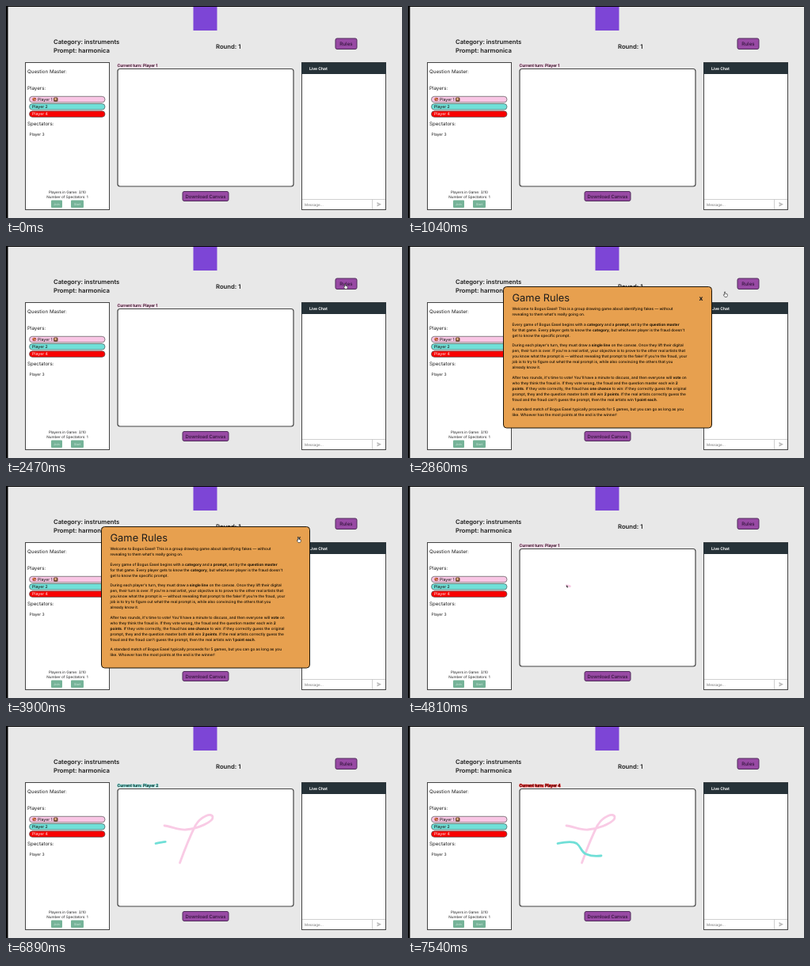
These frames come from a looping animation (500 by 268 pixels, 8000 ms). An HTML page:

```html
<!DOCTYPE html>
<html lang="en">
<head>
<meta charset="utf-8">
<title>Drawing game</title>
<style>
html, body { margin: 0; width: 100%; height: 100%; overflow: hidden; background: #e8e8e8; }
svg { display: block; width: 500px; height: 268px; }
text { font-family: Inter, "Open Sans", sans-serif; fill: #1c1c1c; text-rendering: geometricPrecision; }
.head { font-size: 7.7px; font-weight: 600; }
.label { font-size: 6.2px; }
.small { font-size: 4.6px; }
.pill { font-size: 5.1px; font-weight: 500; }
.mid { text-anchor: middle; }
.halo { paint-order: stroke; stroke-width: 1; stroke-linejoin: round; }
.panel { fill: #fff; stroke: #444; }
.button { fill: #984aa4; stroke: #4f2a5a; }
.caption { fill: #2f1438; font-weight: 500; }
.green { fill: #75b398; }
.tiny { font-size: 3.8px; fill: #d4e9df; }
.ink { fill: none; stroke-width: 2.8; stroke-linecap: round; stroke-linejoin: round; }
.rules text { font-size: 4.75px; font-weight: 500; fill: #120c04; }
.rules .b { font-weight: 700; }
</style>
</head>
<body>
<svg viewBox="0 0 500 268">
  <rect width="500" height="268" fill="#e8e8e8"/>
  <path d="M0 0H500V1H2.5V268H0Z"/>
  <rect x="236.5" y="1" width="30" height="30" fill="#7d45d6"/>

  <text class="head" x="60" y="48">Category: instruments</text>
  <text class="head" x="60" y="59">Prompt: harmonica</text>
  <text class="head" x="265" y="53.5">Round: 1</text>
  <rect class="button" x="416" y="41" width="27" height="13.5" rx="2"/>
  <text class="label caption mid" x="429.5" y="50">Rules</text>

  <rect class="panel" x="24.5" y="71.5" width="106" height="186"/>
  <text class="label" x="27" y="85">Question Master:</text>
  <text class="label" x="27" y="106">Players:</text>
  <g stroke="#555" stroke-width=".7">
    <rect x="29.5" y="114.3" width="95.5" height="7.6" rx="3.8" fill="#f9c6e5"/>
    <rect x="29.5" y="123.5" width="95.5" height="7.6" rx="3.8" fill="#70e0d8"/>
    <rect x="29.5" y="132.8" width="95.5" height="7.6" rx="3.8" fill="#f80000"/>
  </g>
  <ellipse cx="35.8" cy="118" rx="2.6" ry="2.2" fill="#b5523e"/>
  <circle cx="35" cy="117.2" r=".6" fill="#ffd24a"/>
  <circle cx="36.8" cy="118.6" r=".6" fill="#fff"/>
  <rect x="60" y="115.5" width="5.5" height="5.2" rx="1.5" fill="#6b4930"/>
  <circle cx="62.5" cy="117.7" r="1.4" fill="#eeb48a"/>
  <text class="pill" x="40" y="119.8">Player 1</text>
  <text class="pill" x="33" y="129">Player 2</text>
  <text class="pill" x="33" y="138.3" style="fill:#ffd0d0">Player 4</text>
  <text class="label" x="27" y="151">Spectators:</text>
  <text x="29.5" y="164" font-size="5">Player 3</text>
  <text class="small mid" x="77.5" y="236.5">Players in Game: 3/10</text>
  <text class="small mid" x="77.5" y="243">Number of Spectators: 1</text>
  <rect class="green" x="57" y="245.5" width="14" height="9.5" rx="1"/>
  <rect class="green" x="82" y="245.5" width="16" height="9.5" rx="1"/>
  <text class="tiny mid" x="64" y="251.6">Join</text>
  <text class="tiny mid" x="90" y="251.6">Start</text>

  <text id="turn" class="halo" x="140.5" y="77" font-size="5" font-weight="600"></text>
  <rect x="141" y="79.5" width="222" height="148.5" rx="3" fill="#fff" stroke="#444" stroke-width="1.2"/>
  <path id="pink" class="ink" pathLength="1" stroke="#f9cbe5"
    d="M200 126C209 127 217 131.5 227 131C242 130 262 121 261 115C260 109 246 114 239 126C231 142 226 155 219.5 173"/>
  <path id="teal" class="ink" pathLength="1" stroke="#70dfd7"
    d="M189 148.5C196 147 207 144.5 213 148.5C219 153 218 159 225 162C231 164.5 237 165 244 164"/>
  <rect class="button" x="223" y="234.5" width="58" height="12" rx="2"/>
  <text class="caption mid" x="252" y="242.6" font-size="5.9">Download Canvas</text>

  <rect class="panel" x="373.5" y="71.5" width="106" height="186"/>
  <rect x="373" y="71.5" width="107" height="14.5" fill="#263238"/>
  <text x="383" y="81" font-size="5" font-weight="700" style="fill:#fff">Live Chat</text>
  <path d="M374 244.5H479M462.5 244.5V257" stroke="#bbb" stroke-width=".7"/>
  <text class="small" x="377" y="252.8" style="fill:#777">Message...</text>
  <path d="M468.5 248L474 250.8L468.5 253.6V251.4L471.5 250.8L468.5 250.2Z" fill="#b5b5b5"/>

  <g id="modal">
    <rect x="120.5" y="51.5" width="263" height="178.5" rx="4" fill="#e7a04f" stroke="#1c1408"/>
    <text x="131.5" y="70" font-size="12.9">Game Rules</text>
    <text x="367.5" y="69" font-size="8.5" font-weight="700">x</text>
    <g id="rules" class="rules"></g>
  </g>
  <g id="cursor">
    <path id="arrow" d="M0 0V3.6L.9 2.8L1.5 4.1L2.1 3.8L1.5 2.6H2.6Z" fill="#111" stroke="#fff" stroke-width=".3"/>
    <path id="hand" d="M-.5 0H.7V2.3L3.3 2.9V5L2.5 6.5H0L-1.9 3.8L-1.2 3.2L-.5 3.8Z" fill="#fff" stroke="#222" stroke-width=".6"/>
  </g>
</svg>
<script>
const $ = id => document.getElementById(id);
const STEP = 130, LOOP = 8000;

// Blank lines separate paragraphs; asterisks mark bold.
const RULES = `Welcome to Bogus Easel! This is a group drawing game about identifying fakes — without
revealing to them what's really going on.

Every game of Bogus Easel begins with a *category* and a *prompt*, set by the *question master*
for that game. Every player gets to know the *category*, but whichever player is the fraud doesn't
get to know the specific prompt.

During each player's turn, they must draw a *single line* on the canvas. Once they lift their digital
pen, their turn is over. If you're a real artist, your objective is to prove to the other real artists that
you know what the prompt is — without revealing that prompt to the fake! If you're the fraud, your
job is to try to figure out what the real prompt is, while also convincing the others that you
already know it.

After two rounds, it's time to vote! You'll have a minute to discuss, and then everyone will *vote* on
who they think the fraud is. If they vote wrong, the fraud and the question master each win *2*
*points*. If they vote correctly, the fraud has *one chance* to win: if they correctly guess the original
prompt, they and the question master both still win *2 points*. If the real artists correctly guess the
fraud and the fraud can't guess the prompt, then the real artists win *1 point each*.

A standard match of Bogus Easel typically proceeds for 5 games, but you can go as long as you
like. Whoever has the most points at the end is the winner!`;

let y = 81.4;
for (const line of RULES.split("\n")) {
  if (!line) { y += 5.4; continue; }
  const bold = line.replace(/\*(.+?)\*/g, '<tspan class="b">$1</tspan>');
  $("rules").insertAdjacentHTML("beforeend", `<text x="131.5" y="${y}">${bold}</text>`);
  y += 7;
}

// Pointer stops: time, x, y
const STOPS = [[1690, 292, 96], [1950, 310, 58], [2340, 428, 48], [2600, 428, 48],
  [2860, 400, 58], [3250, 374, 64], [3770, 369, 65], [4160, 369, 65], [4680, 200, 125], [4810, 200, 125]];
const TURNS = [[0, 1, "#f5bcdd"], [5720, 2, "#70dfd7"], [7540, 4, "#ff2020"]];

const clamp = v => Math.max(0, Math.min(1, v));
const show = (el, on) => { el.style.visibility = on ? "visible" : "hidden"; };

function pointer(t) {
  if (t > 4810) {
    const p = $("pink").getPointAtLength($("pink").getTotalLength() * clamp((t - 4785) / 805));
    return [p.x, p.y];
  }
  const i = Math.max(1, STOPS.findIndex(s => s[0] >= t));
  const [a, b] = [STOPS[i - 1], STOPS[i]];
  const k = clamp((t - a[0]) / (b[0] - a[0])), e = k * k * (3 - 2 * k);
  return [a[1] + (b[1] - a[1]) * e, a[2] + (b[2] - a[2]) * e];
}

function stroke(id, p) {
  $(id).style.strokeDasharray = `${clamp(p)} 2`;
  show($(id), p > 0);
}

function draw(t) {
  const [, player, color] = TURNS.findLast(turn => t >= turn[0]);
  $("turn").textContent = "Current turn: Player " + player;
  $("turn").style.stroke = color;
  show($("modal"), t >= 2600 && t < 4160);
  stroke("pink", (t - 4785) / 805);
  stroke("teal", (t - 6760) / 650);

  const on = t >= 1690 && t < 5720;
  const hand = on && (t >= 2340 && t < 2990 || t >= 3510 && t < 4160);
  show($("arrow"), on && !hand);
  show($("hand"), hand);
  $("cursor").setAttribute("transform", `translate(${pointer(t)})`);
}

const start = performance.now();
function frame() {
  const t = (performance.now() - start) % LOOP;
  draw(Math.floor(t / STEP) * STEP);
  requestAnimationFrame(frame);
}
frame();
</script>
</body>
</html>
```
